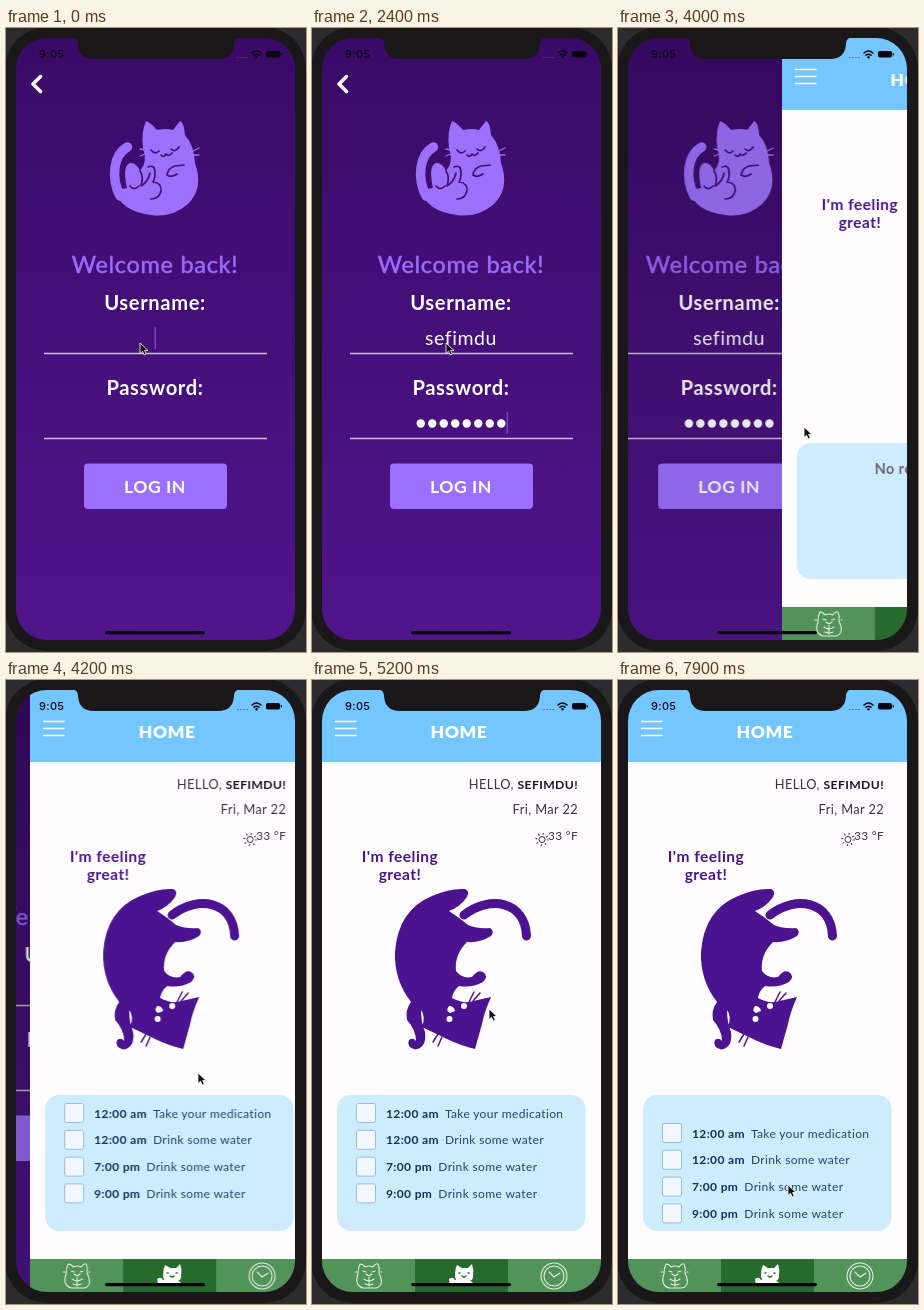
Recreate the animation shown at these times as an HTML page. Size 300 px wide and 624 px high, loop 8 s.

```html
<!DOCTYPE html>
<html lang="en">
<head>
<meta charset="utf-8">
<title>Log in to home</title>
<style>
html, body { margin: 0; height: 100%; overflow: hidden; background: #2c2b2d; }
svg { display: block; width: 300px; height: 624px; font-family: Lato, "Open Sans", sans-serif; }
text { letter-spacing: .03em; }
.b { font-weight: 700; }
.mid { text-anchor: middle; }
.end { text-anchor: end; }
.line { fill: none; stroke-linecap: round; stroke-linejoin: round; }

#login, #home, #shade, #button, #pointer, #list { animation: 8s linear infinite; }
#login { animation-name: leave; }
#home { animation-name: enter; }
#shade { animation-name: dim; }
#button { animation-name: press; }
#pointer { animation-name: point; }
#list { animation-name: pull; }

/* The push runs from 3922 to 4502 ms */
@keyframes enter {
  0% { transform: translateX(280px); }
  49.025% { transform: translateX(280px); animation-timing-function: cubic-bezier(.2833, .99, .3183, .99); }
  56.275%, 100% { transform: none; }
}
@keyframes leave {
  0% { transform: none; }
  49.025% { transform: none; animation-timing-function: cubic-bezier(.2833, .99, .3183, .99); }
  56.275%, 100% { transform: translateX(-84px); }
}
@keyframes dim {
  0% { opacity: 0; }
  49.025% { opacity: 0; animation-timing-function: cubic-bezier(.2833, .99, .3183, .99); }
  56.275%, 100% { opacity: .2; }
}
@keyframes press {
  0%, 43.75% { opacity: 1; }
  45%, 46.5% { opacity: .2; }
  48.75%, 100% { opacity: 1; }
}
@keyframes point {
  0%, 33.25% { transform: translate(134px, 315px); animation-timing-function: ease-in-out; }
  43.5%, 46.5% { transform: translate(144px, 457px); }
  50% { transform: translate(186px, 399px); }
  52.5%, 56% { transform: translate(192px, 393px); animation-timing-function: ease-in-out; }
  64.5%, 72% { transform: translate(177px, 329px); animation-timing-function: ease-in-out; }
  78%, 84.5% { transform: translate(173px, 452px); animation-timing-function: ease-in-out; }
  92%, 94% { transform: translate(169px, 466px); animation-timing-function: ease-out; }
  98.75%, 100% { transform: translate(170px, 505px); }
}
@keyframes pull {
  0%, 94% { transform: none; animation-timing-function: ease-out; }
  98.75%, 100% { transform: translateY(20px); }
}
</style>
</head>
<body>
<svg viewBox="0 0 300 624">
  <defs>
    <linearGradient id="night" x2="0" y2="1">
      <stop stop-color="#3a0a68"/>
      <stop offset="1" stop-color="#50158c"/>
    </linearGradient>
    <clipPath id="screen"><rect x="10" y="10" width="279" height="602" rx="31"/></clipPath>
    <clipPath id="card"><rect x="25" y="415" width="248.500" height="136" rx="14"/></clipPath>
  </defs>

  <rect width="300" height="624" fill="#2c2b2d"/>
  <rect x="-1" y="-1" width="301" height="624" rx="42" fill="#191717"/>

  <g clip-path="url(#screen)">
    <rect x="9" y="9" width="281" height="604" fill="url(#night)"/>

    <g id="login">
      <path class="line" d="M34.500 48.500 27 56l7.500 7.500" stroke="#fff" stroke-width="3.500"/>

      <g fill="#9c70fb">
        <path class="line" d="M121.500 119C107 127 105 150 114 168" stroke="#9c70fb" stroke-width="9.500"/>
        <path d="M140 93Q144 94 151 102 160 100 167 102L174 93Q178 94 179 107 188 117 189 135 198 160 182 176 166 190 145 187 114 183 109 162L121 160Q116 138 124 135 130 134 134 143 142 134 137 120 135 104 140 93Z"/>
        <path class="line" d="M139 122l-5-1M139 126l-5 2M187 123l6-3M188 127l5 0" stroke="#9c70fb" stroke-width="1.300"/>
      </g>
      <path class="line" d="M145 122q4 5 8 1M165 121q4 4 8-2M155 127q3 3 5-1 3 3 6-1M142 139q7-3 7 6 0 6-2 9 9 1 8 9-2 8-10 8M134 143q4 6 1 15 7-4 9-13M133 158q-5 5-9 0M161 147q1-7 8-9l9-1M161 147q4 3 10-1" stroke="#42106f" stroke-width="1.700"/>

      <text class="mid" x="149" y="245" font-size="23.500" fill="#9a6cfb" stroke="#9a6cfb" stroke-width=".5">Welcome back!</text>
      <g class="b mid" font-size="20.200" fill="#fff">
        <text x="149" y="281.500">Username:</text>
        <text x="149" y="366.500">Password:</text>
      </g>
      <path d="M38 325.500H261M38 410.500H261" stroke="#cdbfd2" stroke-width="1.400"/>
      <g id="fields" fill="#fff"></g>

      <g id="button">
        <rect x="78" y="435.500" width="143" height="45.500" rx="4" fill="#9c70ff"/>
        <text class="b mid" x="149" y="464.500" font-size="17.600" fill="#fff">LOG IN</text>
      </g>
    </g>
    <rect id="shade" x="9" y="9" width="281" height="604" opacity="0"/>

    <g id="home">
      <rect x="10" y="9" width="281" height="604" fill="#fffdff"/>
      <rect x="10" y="9" width="281" height="73" fill="#73c6ff"/>
      <path d="M23 41.500H44.500M23 48.500H44.500M23 55.500H44.500" stroke="#fff" stroke-width="1.300"/>
      <text class="mid" x="147" y="58" font-size="17.500" font-weight="900" fill="#fff">HOME</text>

      <g class="mid b" font-size="15.500" fill="#4b1390">
        <text x="88" y="182">I'm feeling</text>
        <text x="88" y="199.500">great!</text>
      </g>

      <g id="loaded">
        <g class="end" font-size="12.800" fill="#3b3140">
          <text x="266" y="109">HELLO, <tspan class="b" font-size="12.200" fill="#1d1524">SEFIMDU!</tspan></text>
          <text x="266" y="134">Fri, Mar 22</text>
          <text x="266" y="160" font-size="11.800">33 °F</text>
        </g>
        <g fill="none" stroke="#3b3140">
          <circle cx="230" cy="159.500" r="3"/>
          <circle cx="230" cy="159.500" r="5.700" stroke-width="2" stroke-dasharray="1 3.476"/>
        </g>

        <path fill="#4b1390" d="M153 209Q158 211 155 217 148 227 137 231 148 238 156 245 166 249 178 248 183 251 179 256 168 263 155 262 142 275 144 291 150 299 160 297 166 289 171 292 177 296 171 302 160 308 147 306 141 311 140 318 149 323 157 322L179 317Q172 333 170 344L163 369Q147 365 135 359L110 347Q114 336 109 330 109 342 113 352 115 368 103 369.500 94 367 97 360 101 357 104 361 104 350 95 340 93 330 99 322 82 300 83 272 86 230 120 216 138 208 153 209Z"/>
        <g class="line" stroke="#4b1390">
          <path d="M152 235C178 215 213 221 214.500 256" stroke-width="9"/>
          <path d="M157 322l5-10M161 321l7-8M126 354l-5 8M130 357l-4 9" stroke-width="1.500"/>
        </g>
        <g fill="#fff">
          <circle cx="152" cy="326" r="3"/>
          <circle cx="137.500" cy="339" r="3"/>
          <path d="M137 326q5 0 6 5l-5 2q-5-2-1-7Z"/>
        </g>
      </g>

      <rect x="25" y="415" width="248.500" height="136" rx="14" fill="#cdedff"/>
      <text id="empty" class="b mid" x="149" y="446" font-size="14.500" fill="#6c6670">No reminders</text>
      <g clip-path="url(#card)"><g id="list" font-size="12" fill="#24426f"></g></g>

      <rect x="10" y="579" width="281" height="34" fill="#519359"/>
      <rect x="103" y="579" width="93" height="34" fill="#266b2b"/>
      <g class="line" stroke="#e4f0e4" stroke-width="1.100">
        <path d="M48 584q3 0 5 3 4-2 8 0 3-4 5-3 2 4 1 9 6 13-3 15H51q-9-3-5-14 0-6 2-10ZM51 591l3 1M60 592l3-1M54 594q3 3 6 0M57 597v9M52 599q5 4 10 0M53 604q4 2 8 0M45 592l-2 0M69 592l1 0"/>
        <circle cx="242" cy="596" r="13"/>
        <circle cx="242" cy="596" r="10"/>
        <path d="M237 592l5 5 6-4"/>
      </g>
      <path fill="#fff" d="M145 585l5 3 6 0 4-4q2 6 1 11 1 6-7 7h-5q-7-1-6-8 0-5 2-9ZM137 599q4-3 6 1l15 1q4 1 3 5H138Z"/>
      <path class="line" d="M147 593h1M156 593h1M150 596q2 2 4 0" stroke="#266b2b" stroke-width="1.400"/>
    </g>

    <text x="33" y="30" font-family="Inter, sans-serif" font-weight="500" font-size="11" letter-spacing="0" fill="#0b0710">9:05</text>
    <g fill="#0b0710">
      <path d="M231 29.500h11" stroke="#55505c" stroke-dasharray="2 1" opacity=".6"/>
      <path class="line" d="M246 25q4.500-4 9 0M248 27.200q2.500-2 5 0" stroke="#0b0710" stroke-width="1.500"/>
      <circle cx="250.500" cy="29.300" r="1.200"/>
      <rect x="260" y="23" width="14" height="6.500" rx="1.800"/>
      <rect x="274.700" y="25" width="1.200" height="2.500"/>
    </g>
    <rect x="99" y="603" width="100" height="3.200" rx="1.600" fill="#090610"/>
  </g>

  <path fill="#191717" d="M64 9Q72 9 72 16 73 31 88 31H212Q227 31 228 16 228 9 236 9Z"/>

  <g id="pointer">
    <path d="M0 0V10.500L2.500 8.300 4.300 12 6.300 11 4.600 7.500H8Z" fill="#111" stroke="#fff" stroke-width=".8"/>
  </g>
</svg>

<script>
const LOOP = 8000, MID = 149;
const $ = id => document.getElementById(id);

function add(parent, tag, attrs, text = '') {
  const el = document.createElementNS('http://www.w3.org/2000/svg', tag);
  for (const key in attrs) el.setAttribute(key, attrs[key]);
  el.textContent = text;
  parent.append(el);
  return el;
}

// Shows an element only between two times of the loop.
function show(el, from, to) {
  const key = (time, opacity) => ({ offset: time / LOOP, opacity, easing: 'steps(1, end)' });
  el.animate([key(0, from ? 0 : 1), key(from, 1), key(to, 0), key(LOOP, 0)],
    { duration: LOOP, iterations: Infinity });
}

// Plays a centred field letter by letter, with its caret at the right.
function type({ count, draw, y, focus, start, step, blur }) {
  for (let n = 0; n <= count; n++) {
    const from = n ? start + (n - 1) * step : focus;
    const until = n < count ? start + n * step : LOOP;
    const group = add($('fields'), 'g', {});
    const width = draw(group, n);
    const caret = add(group, 'rect',
      { x: MID - 0.5 + width / 2, y, width: 1.5, height: 22, fill: '#7444c6' });
    show(group, from, until);
    if (n === count) show(caret, from, blur);
  }
}

const user = 'sefimdu';
type({
  count: user.length, y: 299, focus: 0, start: 150, step: 105, blur: 1000,
  draw(group, n) {
    const text = add(group, 'text', { class: 'mid', x: MID, y: 317, 'font-size': 19.5 }, user.slice(0, n));
    return n ? text.getComputedTextLength() + 2 : 0;
  }
});

type({
  count: 8, y: 384, focus: 1000, start: 1350, step: 150, blur: 3000,
  draw(group, n) {
    const gap = 11.5;
    for (let i = 0; i < n; i++)
      add(group, 'circle', { cx: MID + (i - (n - 1) / 2) * gap, cy: 395.5, r: 4.2 });
    return n * gap;
  }
});

const tasks = [
  ['12:00 am', 'Take your medication'],
  ['12:00 am', 'Drink some water'],
  ['7:00 pm', 'Drink some water'],
  ['9:00 pm', 'Drink some water']
];
tasks.forEach(([time, task], i) => {
  const y = 433 + i * 26.8;
  add($('list'), 'rect', { x: 44.5, y: y - 9.5, width: 19, height: 19, rx: 2, fill: '#f3f7ff', stroke: '#94bce8' });
  const row = add($('list'), 'text', { x: 74, y: y + 4.5 });
  add(row, 'tspan', { class: 'b', fill: '#14305f' }, time);
  add(row, 'tspan', { dx: 6 }, task);
});

show($('empty'), 0, 4100);
show($('loaded'), 4100, LOOP);
show($('list'), 4100, LOOP);
</script>
</body>
</html>
```
